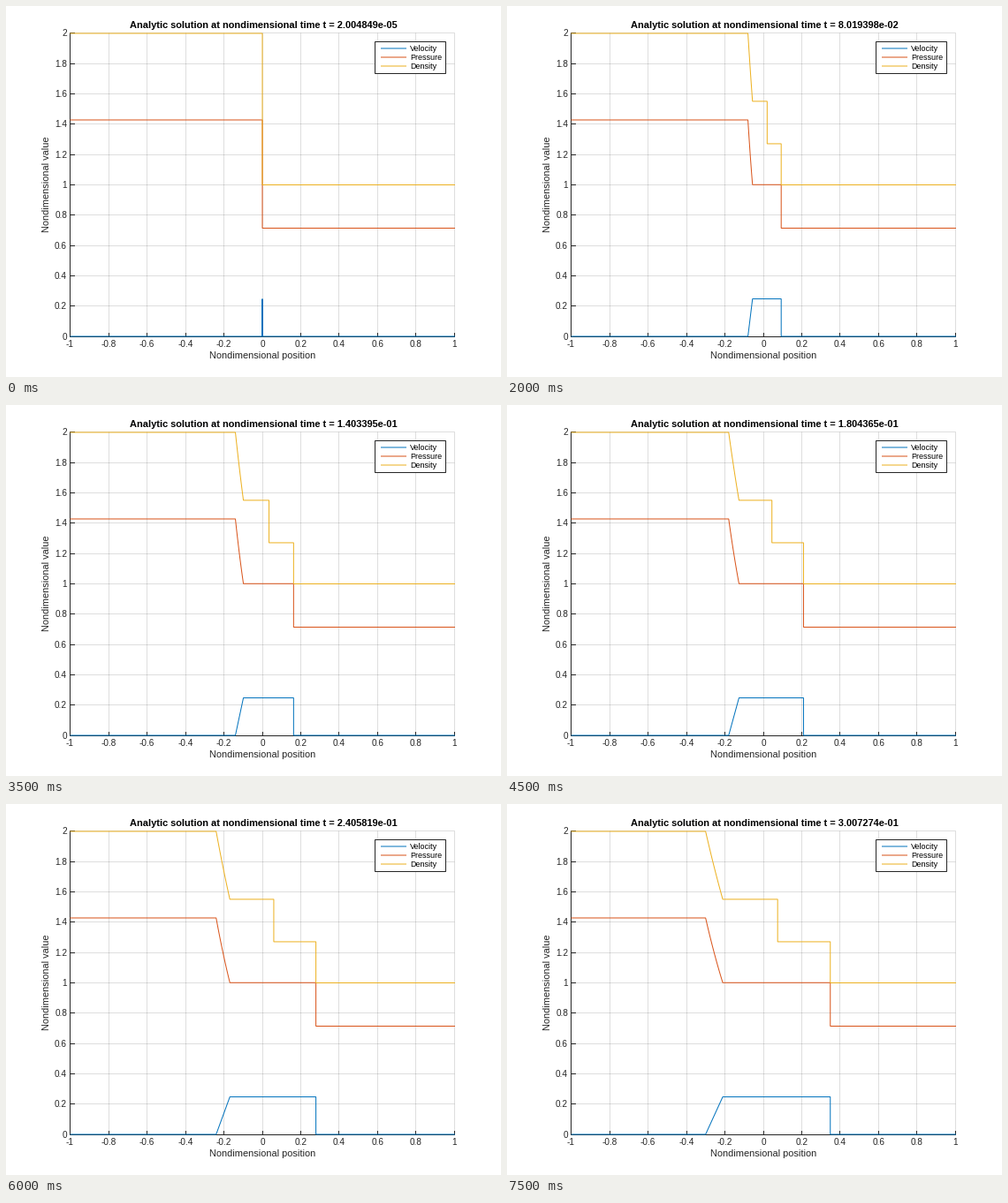
A matplotlib script that plays this animation: 560 by 420 pixels, repeating every 8 s.

```python
import math

import matplotlib.pyplot as plt
import numpy as np
from matplotlib.animation import FuncAnimation
from matplotlib.patches import Rectangle

W, H, DPI = 560, 420, 80
PX = 72 / DPI  # one pixel in points
FRAMES, INTERVAL = 16, 500
DT = 0.0200484945
HELD = 8  # step at which the previous picture stays on

INK = "#262626"
BLUE, ORANGE, YELLOW = "#0072bd", "#d95319", "#edb120"

plt.rcParams["font.family"] = "Liberation Sans"

# Shock tube states
RHO_L, P_L = 2.0, 1 / 0.7
RHO_R, P_R = 1.0, 0.5 / 0.7


def fan_pressure(u):
    return P_L * (1 - 0.2 * u) ** 7


def fan_density(u):
    return RHO_L * (1 - 0.2 * u) ** 5


def shock_velocity(p):
    return (p - P_R) * math.sqrt(2 / 2.4 / RHO_R / (p + P_R / 6))


def solve_star():
    """Velocity shared by both sides of the contact, by bisection."""
    low, high = 0.0, 0.5
    for _ in range(60):
        mid = (low + high) / 2
        if shock_velocity(fan_pressure(mid)) > mid:
            low = mid
        else:
            high = mid
    return low


U = solve_star()
P = fan_pressure(U)
RHO_2 = RHO_R * (P / P_R + 1 / 6) / (P / P_R / 6 + 1)
SHOCK = math.sqrt(2.4 / 2.8 * P / P_R + 0.4 / 2.8)


# Plot values to stage pixels
def px(x):
    return 290 + 217.25 * x


def py(v):
    return 374 - 171.51 * v


def crisp(pos):
    return math.floor(pos) + 0.5


fig = plt.figure(figsize=(W / DPI, H / DPI), dpi=DPI, facecolor="white")
ax = fig.add_axes([0, 0, 1, 1])
ax.set_xlim(0, W)
ax.set_ylim(H, 0)
ax.axis("off")


def line(xs, ys, color, z, alpha=1):
    return ax.plot(xs, ys, color=color, lw=PX, zorder=z, alpha=alpha,
                   snap=False, solid_capstyle="butt",
                   solid_joinstyle="miter")[0]


def label(x, y, s, size, ha="center", va="baseline", color=INK, **kw):
    return ax.text(x, y, s, fontsize=size * PX, ha=ha, va=va,
                   color=color, zorder=8, **kw)


LEFT, RIGHT = crisp(px(-1)), crisp(px(1))
TOP, BOTTOM = crisp(py(2)), crisp(py(0))

for i in range(11):
    x, v = -1 + 0.2 * i, 0.2 * i
    gx, gy = crisp(px(round(x, 1))), crisp(py(v))
    line([gx, gx], [TOP, BOTTOM], INK, 1, alpha=0.15)
    line([LEFT, RIGHT], [gy, gy], INK, 1, alpha=0.15)
    line([gx, gx], [BOTTOM, BOTTOM - 4.5], INK, 2)
    line([LEFT, LEFT + 5.5], [gy, gy], INK, 2)
    label(gx, 386, f"{round(x, 1) + 0.0:g}", 10)
    label(69, gy + 3.5, f"{v:.2g}", 10, ha="right")

line([LEFT, LEFT], [TOP, BOTTOM + 0.5], INK, 2)
line([LEFT - 0.5, RIGHT + 0.5], [BOTTOM, BOTTOM], INK, 2)
label(290, 399, "Nondimensional position", 11)
label(51.5, 201.5, "Nondimensional value", 11, ha="right", va="center",
      rotation=90)
title = label(291.5, 25, "", 11, color="black", weight="bold")

ax.add_patch(Rectangle((417.5, 40.5), 80, 36, fc="white", ec=INK,
                       lw=PX, zorder=6, snap=False))
for name, color, y in (("Velocity", BLUE, 48),
                       ("Pressure", ORANGE, 58),
                       ("Density", YELLOW, 68)):
    line([424, 453], [y, y], color, 7)
    label(457, y + 3, name, 9, ha="left", color="black")

velocity = line([], [], BLUE, 3)
pressure = line([], [], ORANGE, 4)
density = line([], [], YELLOW, 5)


def profile(t, fan, jumps):
    """Flat, rarefaction curve, then (speed, next level) jumps."""
    u = np.linspace(0, U, 24)
    xs = [LEFT, *px((1.2 * u - 1) * t)]
    ys = [py(fan(0)), *py(fan(u))]
    for speed, value in jumps:
        xs += [px(speed * t)] * 2
        ys += [ys[-1], py(value)]
    return xs + [RIGHT + 0.5], ys + [ys[-1]]


def draw(i):
    step = HELD - 1 if i == HELD else i
    t = DT * max(step, 0.001)
    title.set_text(f"Analytic solution at nondimensional time t = {t:.6e}")
    velocity.set_data(*profile(t, lambda u: u, [(SHOCK, 0)]))
    pressure.set_data(*profile(t, fan_pressure, [(SHOCK, P_R)]))
    density.set_data(*profile(t, fan_density, [(U, RHO_2), (SHOCK, RHO_R)]))
    return title, velocity, pressure, density


anim = FuncAnimation(fig, draw, frames=FRAMES, init_func=lambda: draw(0),
                     interval=INTERVAL, repeat=True, repeat_delay=0)
plt.show()
```
